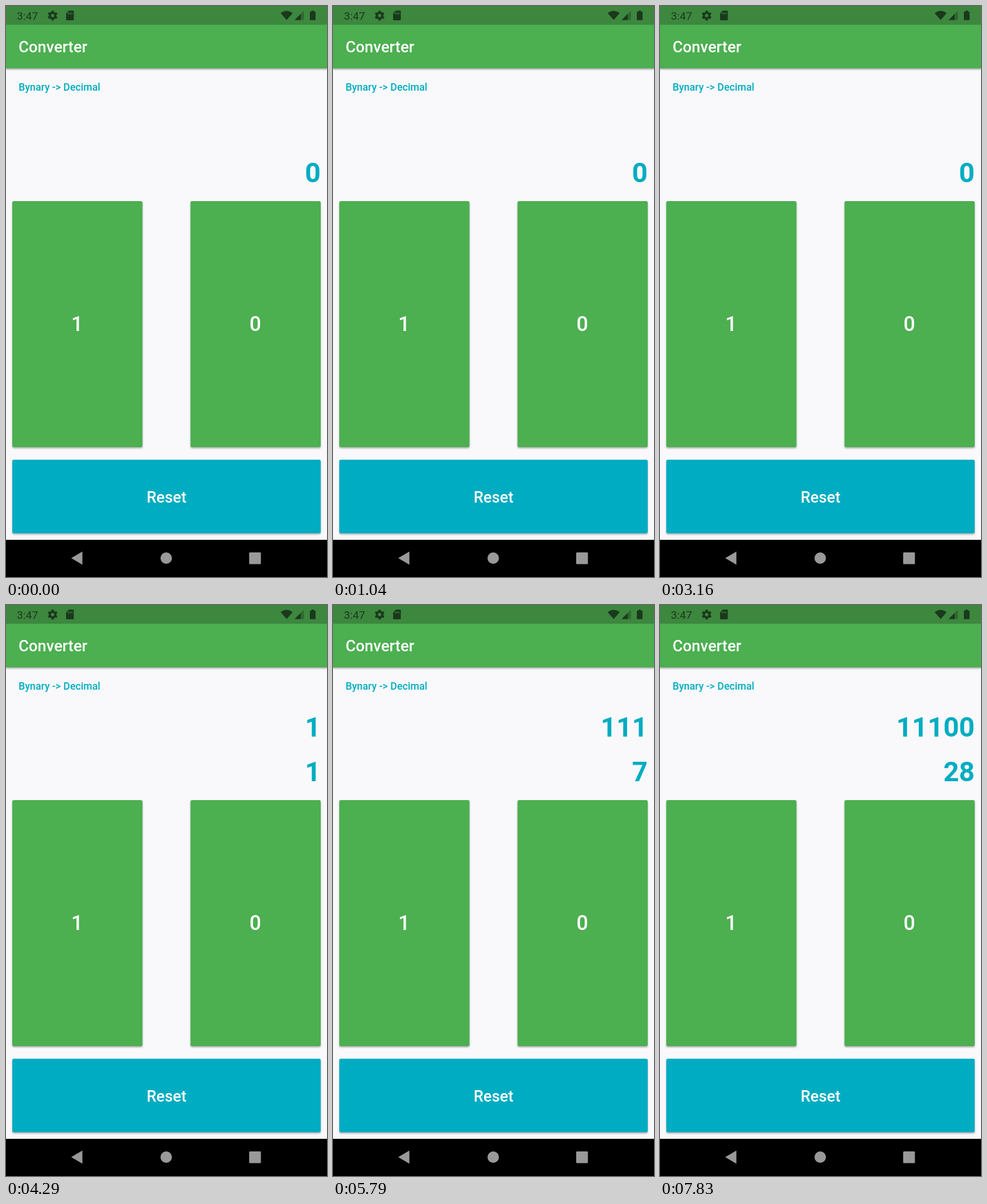
An HTML page for the animation above (8 s loop, 561 px wide and 998 px high).

```html
<!DOCTYPE html>
<html lang="en">
<head>
<meta charset="utf-8">
<title>Converter</title>
<style>
  html, body { margin: 0; width: 100%; height: 100%; overflow: hidden; background: #f9f9fc; }
  svg { display: block; width: 100%; height: 100%; }
  text { font-family: Roboto, sans-serif; font-weight: 500; }
  .label { fill: #fff; text-anchor: middle; }
  .value { fill: #00acc1; font-weight: 700; font-size: 47.8px; text-anchor: end; }
  .raised { filter: drop-shadow(0 2px 1.5px rgba(0, 0, 0, .32)); }
</style>
</head>
<body>
<svg viewBox="0 0 561 998" preserveAspectRatio="none">
  <defs>
    <clipPath id="clip1"><rect x="11" y="341" width="227.5" height="430" rx="2.7"/></clipPath>
    <clipPath id="clip0"><rect x="322.5" y="341" width="227.5" height="430" rx="2.7"/></clipPath>
  </defs>
  <rect width="561" height="998" fill="#f9f9fc"/>

  <rect class="raised" width="561" height="109" fill="#4caf50"/>
  <rect width="561" height="32.7" fill="#3d873f"/>
  <text x="22" y="81" font-size="27.3" fill="#fff">Converter</text>

  <g fill="#1b391c">
    <text x="19" y="24" font-size="19.2" style="font-weight:400">3:47</text>
    <g transform="translate(81.5 16.7)">
      <circle r="4.8" fill="none" stroke="#1b391c" stroke-width="3.8"/>
      <g id="teeth"></g>
    </g>
    <path d="M110 8h7q1.500 0 1.500 1.500v14q0 1.500-1.500 1.500h-10.500q-1.500 0-1.500-1.500v-10.500z"/>
    <path d="M108.600 11.500v3M111.800 11.500v3M115 11.500v3" stroke="#3d873f" stroke-width="1.500"/>
    <path d="M480 12.500Q490.500 4.500 501 12.500L490.500 24.500z"/>
    <path d="M520.500 8.500v16h-16z" opacity=".4"/>
    <path d="M515 14v10.500h-10.500z"/>
    <path d="M534 8h4v1.800h2q1 0 1 1v13q0 1-1 1h-8q-1 0-1-1v-13q0-1 1-1h2z"/>
  </g>

  <text x="22" y="148" font-size="17.75" fill="#00acc1">Bynary -&gt; Decimal</text>
  <text id="binary" class="value" x="550" y="230"></text>
  <text id="decimal" class="value" x="550" y="308"></text>

  <g id="keys"></g>

  <rect class="raised" x="11" y="793" width="539" height="128.500" rx="2.7" fill="#00acc1"/>
  <text class="label" x="280.500" y="868" font-size="27.3">Reset</text>

  <rect y="933" width="561" height="65"/>
  <g fill="#999">
    <path d="M114 965L133.500 953.500V976.500z"/>
    <circle cx="280" cy="965" r="10"/>
    <rect x="425" y="955" width="20.500" height="20.500" rx="1.500"/>
  </g>
</svg>
<script>
  const LOOP = 8000, HOLD = 45, FADE = 200;
  const SPEED = 1.365;
  const taps = [
    { at: 3780, key: '1' },
    { at: 4540, key: '1' },
    { at: 5300, key: '1' },
    { at: 6825, key: '0' },
    { at: 7540, key: '0' }
  ];
  const $ = id => document.getElementById(id);
  const clamp = v => Math.max(0, Math.min(1, v));

  function makeKey(name, x, touchX) {
    const mid = x + 113.75;
    $('keys').insertAdjacentHTML('beforeend', `
      <rect class="raised" x="${x}" y="341" width="227.5" height="430" rx="2.7" fill="#4caf50"/>
      <g clip-path="url(#clip${name})">
        <rect id="glow${name}" x="${x}" y="341" width="227.5" height="430" fill="#bcbcbc" opacity="0"/>
        <circle id="splash${name}" cx="${touchX}" cy="520" r="0" fill="#c8c8c8" opacity="0"/>
      </g>
      <text class="label" x="${mid - .5}" y="568.3" font-size="36">${name}</text>`);
  }
  makeKey('1', 11, 122);
  makeKey('0', 322.5, 434);

  for (let a = 0; a < 360; a += 60) {
    $('teeth').insertAdjacentHTML('beforeend',
      `<rect x="-2" y="-8.6" width="4" height="4" transform="rotate(${a})"/>`);
  }

  // Ink splash grows slowly while held, then quickly as it fades.
  function drawInk(key, t) {
    const tap = taps.find(p => p.key === key && t >= p.at && t < p.at + HOLD + FADE);
    const age = tap ? t - tap.at : 0;
    const after = Math.max(0, age - HOLD);
    const glow = clamp((Math.min(age, HOLD) - after) / FADE);
    const splash = $('splash' + key);
    $('glow' + key).setAttribute('opacity', glow * .4);
    splash.setAttribute('r', Math.min(age, HOLD) * .22 + after * SPEED);
    splash.setAttribute('opacity', tap ? .4 * (1 - after / FADE) : 0);
  }

  function render(t) {
    const bits = taps.filter(p => t >= p.at + HOLD).map(p => p.key).join('');
    $('binary').textContent = bits;
    $('decimal').textContent = parseInt(bits || '0', 2);
    drawInk('1', t);
    drawInk('0', t);
  }

  const start = performance.now();
  function tick(now) {
    render(Math.max(0, now - start) % LOOP);
    requestAnimationFrame(tick);
  }
  render(0);
  requestAnimationFrame(tick);
</script>
</body>
</html>
```
